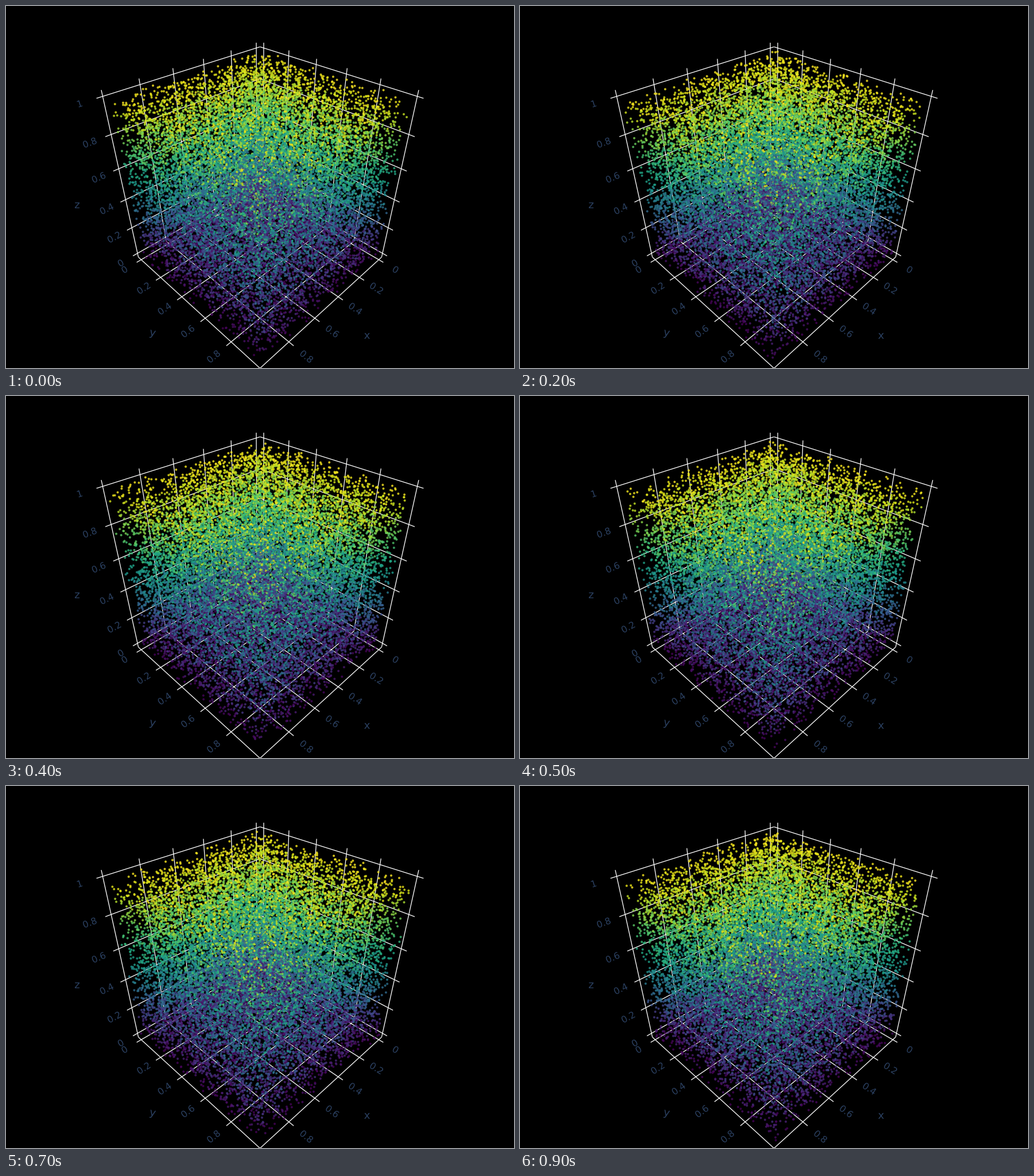
Recreate the animation shown at these times as a matplotlib script. Size 885 by 632 pixels, loop 1000 ms.

```python
import numpy as np
import matplotlib.pyplot as plt
from matplotlib.animation import FuncAnimation
from matplotlib.collections import LineCollection
from matplotlib.patches import PathPatch
from matplotlib.textpath import TextPath
from matplotlib.transforms import Affine2D

W, H, DPI = 885, 632, 64
FRAMES, INTERVAL = 10, 100
N_POINTS = 20000
DOT_PX, GRID_PX = 4.0, 1.3
OPACITY = 0.8
TEXT_COLOR = "#2a3f5f"
TICK_PX, TITLE_PX = 16, 18.5

# Perspective camera on the (1, 1, 1) diagonal with a 45 degree field of view.
EYE = 1.25 * np.sqrt(3)
FOCAL = H / 2 / np.tan(np.pi / 8)
RIGHT = np.array([-1, 1, 0]) / np.sqrt(2)
UP = np.array([-1, -1, 2]) / np.sqrt(6)
TOWARD = np.array([1, 1, 1]) / np.sqrt(3)

EDGE = 0.5            # half side of the scene box
LABEL_AT = 0.577      # distance of the tick labels from the centre
TICKS = np.arange(6) / 5


def to_scene(t):
    """Map data in 0..1 into the box, which is padded by 1/32 on each side."""
    return (np.asarray(t) - 0.5) * 16 / 17


def project(p):
    p = np.asarray(p, float)
    scale = FOCAL / (EYE - p @ TOWARD)
    return np.stack([W / 2 + p @ RIGHT * scale, H / 2 + p @ UP * scale], axis=-1)


def grid_lines():
    """Grid lines on the floor and on the two back walls."""
    lines = []
    for axis in range(3):
        for along in {0, 1, 2} - {axis}:
            for t in to_scene(TICKS):
                ends = np.full((2, 3), -EDGE)
                ends[:, axis] = t
                ends[1, along] = EDGE
                lines.append(project(ends))
    return lines


def add_label(ax, text, center, size, angle=0):
    path = TextPath((0, 0), text, size=size, prop={"family": "DejaVu Sans"})
    box = path.get_extents()
    move = (Affine2D()
            .translate(-(box.x0 + box.x1) / 2, -(box.y0 + box.y1) / 2)
            .rotate_deg(angle)
            .translate(*center))
    ax.add_patch(PathPatch(move.transform_path(path), fc=TEXT_COLOR, lw=0))


def add_tick_labels(ax, axis, outward):
    for t in TICKS:
        anchor = np.full(3, -EDGE)
        anchor[axis] = to_scene(t)
        anchor[outward] = EDGE
        inner = project(anchor)
        anchor[outward] = LABEL_AT
        center = project(anchor)
        if center[1] < 0:
            continue
        dx, dy = center - inner
        add_label(ax, f"{t:g}", center, TICK_PX, np.degrees(np.arctan(dy / dx)))


fig = plt.figure(figsize=(W / DPI, H / DPI), dpi=DPI, facecolor="black")
ax = fig.add_axes([0, 0, 1, 1])
ax.set(xlim=(0, W), ylim=(0, H))
ax.axis("off")

ax.add_collection(LineCollection(grid_lines(), colors="white",
                                 linewidths=GRID_PX * 72 / DPI, zorder=1),
                  autolim=False)
for axis, outward in ((0, 1), (1, 0), (2, 0)):
    add_tick_labels(ax, axis, outward)
for name, center, angle in (("x", (629, 56), 0), ("y", (255, 59), -12),
                            ("z", (124, 284), 0)):
    add_label(ax, name, center, TITLE_PX, angle)

dots = ax.scatter([], [], s=(DOT_PX * 72 / DPI) ** 2, linewidths=0, zorder=2)
viridis = plt.get_cmap("viridis")


def update(frame):
    # Dots are painted in random order, without depth sorting.
    data = np.random.default_rng(100 + frame).random((N_POINTS, 3))
    dots.set_offsets(project(to_scene(data)))
    dots.set_facecolor(viridis(data[:, 2], alpha=OPACITY))
    return [dots]


anim = FuncAnimation(fig, update, frames=FRAMES, interval=INTERVAL,
                     repeat=True, repeat_delay=0)
plt.show()
```
